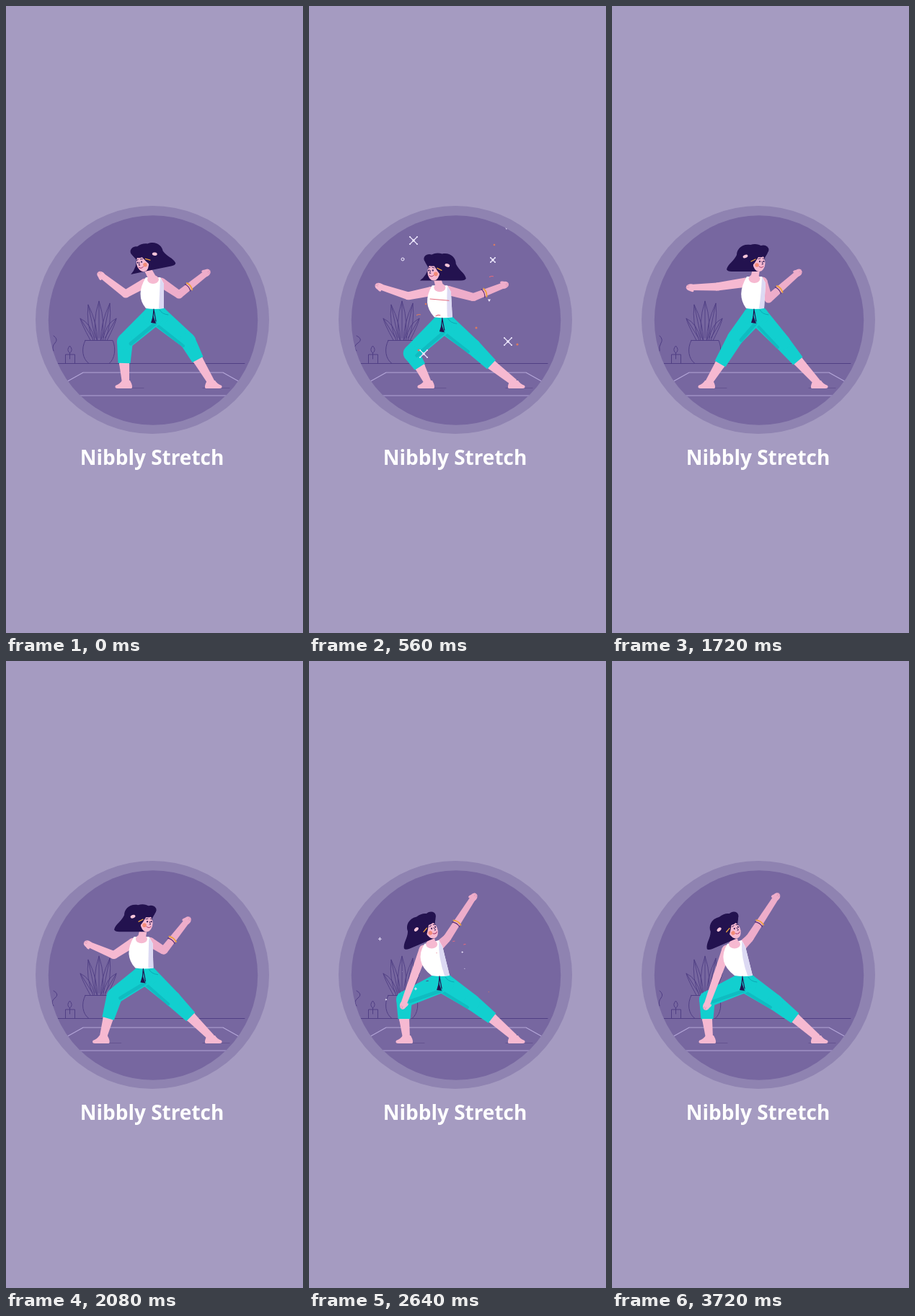
Write an HTML page with a canvas that moves like this. It is 412x869 px and loops after 3.8 s.

```html
<!DOCTYPE html>
<html lang="en">
<head>
<meta charset="utf-8">
<title>Nibbly Stretch</title>
<style>
  html, body { margin: 0; width: 100%; height: 100%; overflow: hidden; background: #a59bc1; }
  canvas { position: absolute; left: 0; top: 0; width: 412px; height: 869px; }
  h1 {
    position: absolute; left: 0; top: 605px; width: 405px; margin: 0;
    font: 700 28px/40px "Noto Sans", "Open Sans", sans-serif;
    color: #fff; text-align: center; white-space: nowrap;
  }
</style>
</head>
<body>
<canvas></canvas>
<h1>Nibbly Stretch</h1>
<script>
const LOOP = 3800, STEP = 40, TAU = Math.PI * 2;
const canvas = document.querySelector('canvas');
const ctx = canvas.getContext('2d');
const dpr = window.devicePixelRatio || 1;
canvas.width = 412 * dpr;
canvas.height = 869 * dpr;

const SKIN = '#f6b9d1', SKIN_BACK = '#eeadca', HAIR = '#23124f', PANTS = '#12cfcf',
      PANTS_DARK = '#0fbcc1', INK = '#503f84', WHITE = '#f0eaff', ORANGE = '#d87a60', RED = '#e36a7c';

// Joint order: face, shoulders, left elbow/hand, right elbow/hand, waist,
// left knee/hem/ankle, right knee/hem. "dir" is the side she looks to.
const rise = { dir: -1, tilt: -0.2, joints: [
  [191,354], [191,380], [217,380], [166,399], [132,373], [240,400], [278,370],
  [207,419], [165,465], [164,495], [166,522], [252,464], [266,490]] };
const lunge = { dir: -1, tilt: 0, joints: [
  [175,366], [168,391], [195,391], [138,402], [98,388], [228,404], [271,386],
  [187,431], [142,481], [154,500], [165,522], [227,472], [253,497]] };
const settle = { dir: -1, tilt: 0, joints: [
  [174,369], [167,393], [194,393], [136,401], [95,393], [228,401], [271,391],
  [186,433], [140,483], [153,500], [165,522], [227,473], [253,497]] };
const turn = { dir: 1, tilt: 0, joints: [
  [202,354], [184,379], [211,379], [146,389], [109,390], [217,406], [258,370],
  [199,419], [171,460], [150,496], [134,522], [236,466], [258,492]] };
const sweep = { dir: 1, tilt: 0, joints: [
  [187,366], [168,391], [195,391], [152,420], [117,394], [220,398], [247,353],
  [188,430], [137,467], [136,495], [135,522], [228,470], [255,494]] };
const reach = { dir: 1, tilt: -0.4, joints: [
  [167,372], [157,396], [183,391], [146,436], [131,478], [191,384], [228,327],
  [183,436], [132,469], [132,496], [135,522], [226,473], [254,495]] };

const easeOut = u => 1 - (1 - u) ** 2;
const easeIn = u => u ** 3;
const easeBoth = u => (1 - Math.cos(Math.PI * u)) / 2;
const keys = [
  { at: 0, pose: rise },
  { at: 540, pose: lunge, ease: easeBoth },
  { at: 820, pose: settle, ease: easeOut },
  { at: 1460, pose: settle, ease: easeOut },
  { at: 1720, pose: turn, ease: easeIn },
  { at: 2360, pose: sweep, ease: easeBoth },
  { at: 2680, pose: reach, ease: easeOut },
  { at: LOOP, pose: reach, ease: easeOut }
];

// Each spark: kind, colour, x, y, size; places hold at the burst's "ref" time.
const bursts = [
  { from: 440, ref: 560, to: 940, sparks: [
    ['x', WHITE, 145, 325, 5], ['x', WHITE, 255, 352, 3], ['x', WHITE, 276, 465, 5],
    ['x', WHITE, 159, 482, 5], ['v', WHITE, 250, 408, 2], ['v', WHITE, 274, 308, 2],
    ['o', WHITE, 130, 351, 2], ['.', ORANGE, 257, 331, 1.3], ['~', RED, 253, 375, 2.5],
    ['.', ORANGE, 232, 446, 1.5], ['.', ORANGE, 289, 469, 1.6], ['~', ORANGE, 152, 428, 2.5],
    ['.', ORANGE, 152, 477, 1.5], ['-', RED, 181, 407, 13], ['~', RED, 179, 429, 3],
    ['.', ORANGE, 162, 413, 1.3]] },
  { from: 800, ref: 1200, to: 1440, sparks: [
    ['v', WHITE, 106, 340, 2.4], ['+', WHITE, 271, 344, 5], ['+', WHITE, 98, 447, 2.5],
    ['>', WHITE, 260, 481, 2.5], ['o', ORANGE, 322, 483, 2.3], ['+', WHITE, 154, 510, 7],
    ['~', WHITE, 207, 427, 2]] },
  { from: 2240, ref: 2360, to: 2720, sparks: [
    ['+', WHITE, 105, 387, 5], ['+', WHITE, 151, 451, 4], ['o', WHITE, 113, 465, 2],
    ['.', RED, 178, 405, 1.5], ['~', RED, 214, 394, 3], ['.', ORANGE, 245, 455, 1.7],
    ['.', WHITE, 214, 425, 1.5], ['.', WHITE, 134, 429, 1], ['o', WHITE, 211, 404, 1.8],
    ['~', RED, 200, 390, 3], ['.', ORANGE, 129, 487, 1.3], ['~', INK, 166, 441, 3]] },
  { from: 2680, ref: 3040, to: 3420, sparks: [
    ['+', WHITE, 237, 386, 5], ['+', WHITE, 326, 446, 7], ['+', WHITE, 110, 485, 7],
    ['+', WHITE, 87, 437, 2.3], ['.', ORANGE, 312, 476, 1.7], ['.', ORANGE, 73, 424, 1.2],
    ['~', WHITE, 206, 416, 16], ['~', RED, 242, 468, 10], ['~', WHITE, 188, 441, 11],
    ['~', ORANGE, 141, 430, 3], ['.', INK, 265, 376, 1.3], ['.', INK, 283, 331, 1.3]] }
];

const mix = (a, b, u) => a + (b - a) * u;
const mixPoint = (a, b, u) => [mix(a[0], b[0], u), mix(a[1], b[1], u)];
const shift = (p, x, y) => [p[0] + x, p[1] + y];

function poseAt(t) {
  const i = Math.max(1, keys.findIndex(k => t < k.at));
  const a = keys[i - 1], b = keys[i];
  const raw = (t - a.at) / (b.at - a.at), u = b.ease(raw);
  return {
    dir: raw < 0.75 ? a.pose.dir : b.pose.dir,
    tilt: mix(a.pose.tilt, b.pose.tilt, u),
    joints: a.pose.joints.map((p, n) => mixPoint(p, b.pose.joints[n], u))
  };
}

function fillPath(color, d) { ctx.fillStyle = color; ctx.fill(new Path2D(d)); }

function strokePath(color, width, d) {
  ctx.strokeStyle = color;
  ctx.lineWidth = width;
  ctx.stroke(new Path2D(d));
}

function oval(color, x, y, rx, ry = rx, turnBy = 0) {
  ctx.fillStyle = color;
  ctx.beginPath();
  ctx.ellipse(x, y, rx, ry, turnBy, 0, TAU);
  ctx.fill();
}

// Tapered chain of segments with rounded joints.
function limb(color, points, radii) {
  ctx.fillStyle = color;
  for (let i = 1; i < points.length; i++) {
    const [ax, ay] = points[i - 1], [bx, by] = points[i];
    const len = Math.hypot(bx - ax, by - ay) || 1;
    const nx = (ay - by) / len, ny = (bx - ax) / len, ra = radii[i - 1], rb = radii[i];
    ctx.beginPath();
    ctx.moveTo(ax + nx * ra, ay + ny * ra);
    ctx.lineTo(bx + nx * rb, by + ny * rb);
    ctx.lineTo(bx - nx * rb, by - ny * rb);
    ctx.lineTo(ax - nx * ra, ay - ny * ra);
    ctx.fill();
    oval(color, ax, ay, ra);
  }
}

function drawRoom(t) {
  strokePath(INK, 1, 'M60 495.5H331');
  strokePath('#b4a6d8', 1.2, 'M40 545.5L107 508H301L368 545.5M60 540H346');
  strokePath(INK, 1, 'M110 463.5H148C153 475 151 489 143 495.5H115C106 489 104 475 110 463.5Z');
  for (const [x, y, w] of [[129, 409, 7], [114, 414, 5], [144, 412, 5], [103, 433, 4], [153, 433, 4]]) {
    const base = 129 + (x - 129) * 0.35, mid = (x + base) / 2;
    strokePath(INK, 0.9, `M${base - 3} 463Q${mid - w - 3} 440 ${x} ${y}Q${mid + w + 3} 440 ${base + 3} 463M${x} ${y}L${base} 460`);
  }
  strokePath(INK, 1, 'M82.5 495V483H95.5V495M88.5 489V481M88.5 481Q83 477 88.5 471Q94 477 88.5 481');
  const sway = 3 * Math.sin(t / 1900 * TAU);
  strokePath(INK, 1, `M66 457Q${73 + sway} 462 68 467T66 478`);
}

function drawFoot(ankle, dir) {
  ctx.save();
  ctx.translate(...ankle);
  strokePath('#655490', 1.2, 'M-12 7.5H25');
  ctx.scale(dir, 1);
  fillPath(SKIN, 'M-6 -3H5Q8 2 14 4Q16 8 11 8H-8Q-11 6 -6 -3Z');
  ctx.restore();
}

function drawHand(elbow, hand, color) {
  const angle = Math.atan2(hand[1] - elbow[1], hand[0] - elbow[0]);
  ctx.save();
  ctx.translate(...hand);
  ctx.rotate(angle);
  oval(color, 0, 0, 6.2, 4.8);
  oval(color, -1, -4, 3.5, 1.8, 0.5);
  strokePath('#d992b5', 0.7, 'M2 0H6M2 2.5H5');
  ctx.restore();
}

function drawBracelet(elbow, hand) {
  const [x, y] = mixPoint(elbow, hand, 0.38);
  ctx.save();
  ctx.translate(x, y);
  ctx.rotate(Math.atan2(hand[1] - elbow[1], hand[0] - elbow[0]));
  strokePath('#eea23c', 1.8, 'M0 -6Q3 0 0 6');
  strokePath('#5c2c72', 1.1, 'M-3 -6Q0 0 -3 6');
  ctx.restore();
}

function drawHead(face, tilt, dir) {
  ctx.save();
  ctx.translate(...face);
  ctx.rotate(tilt);
  ctx.scale(dir, 1);
  fillPath(HAIR, 'M14 -12C8 -22 0 -26 -10 -23C-22 -25 -29 -17 -29 -9C-33 0 -41 3 -43 11Q-42 14 -36 14H2L10 -5Z');
  if (dir < 0) fillPath(HAIR, 'M8 -8Q11 7 21 14H2Z');
  oval(HAIR, 8, -16, 7.5, 6.5);
  oval(SKIN, 2, 2, 8.5, 12);
  fillPath(HAIR, 'M13 -10Q8 -5 1 -6Q-3 1 -8 7L-14 -12L5 -15Z');
  oval('#f38c78', -1, 5, 2.8);
  oval(HAIR, 3, 0, 0.9, 1.2);
  oval(HAIR, 8.5, 0, 0.9, 1.2);
  strokePath(HAIR, 0.8, 'M1 -3.5L4 -4M7 -4L10 -3M6 0L7.5 4H6');
  strokePath('#a33263', 0.9, 'M2 7Q5 10 8 7');
  oval('#f7c5d9', -17, -7, 3.5, 2.2, -0.35);
  strokePath('#eea23c', 1.3, 'M-9 0L-3 -3');
  ctx.restore();
}

function drawWoman({ joints, tilt, dir }) {
  const [face, shL, shR, elL, handL, elR, handR, waist, kneeL, hemL, ankleL, kneeR, hemR] = joints;
  const ankleR = [285, 522];
  const hipL = shift(waist, -3, 11), hipR = shift(waist, 4, 11);
  const [wx, wy] = waist;

  limb(SKIN_BACK, [shift(shR, -2, 3), elR, handR], [6.5, 5.5, 4]);
  drawHand(elR, handR, SKIN_BACK);
  drawBracelet(elR, handR);

  limb(SKIN, [hemR, ankleR], [7, 5]);
  limb(SKIN, [hemL, ankleL], [7, 5]);
  drawFoot(ankleR, 1);
  drawFoot(ankleL, -1);

  limb(PANTS, [hipR, kneeR, hemR], [14, 11, 8.5]);
  const inner = shift(hipR, -3, 11);
  strokePath(PANTS_DARK, 4, `M${inner}L${shift(kneeR, -6, 7)}`);
  limb(PANTS, [hipL, kneeL, hemL], [14, 11, 8.5]);
  strokePath(PANTS_DARK, 5, `M${shift(hipL, 3, 10)}L${shift(kneeL, 8, 3)}`);
  strokePath('#0a9fae', 0.8, `M${wx + 6} ${wy + 2}Q${wx + 9} ${wy + 8} ${wx + 18} ${wy + 9}`);

  limb(SKIN, [shift(shL, 2, 4), elL, handL], [6.5, 5.5, 4]);
  drawHand(elL, handL, SKIN);

  const chest = mixPoint(shL, shR, 0.5);
  const [lx, ly] = shL, [rx, ry] = shR;
  fillPath('#fff', `M${lx + 3} ${ly - 4}Q${lx - 12} ${ly + 21} ${wx - 13} ${wy}Q${wx} ${wy + 2} ${wx + 12} ${wy}L${rx + 2} ${ry + 5}L${rx - 3} ${ry - 4}Z`);
  fillPath('#dcd9f3', `M${rx - 3} ${ry - 3}L${rx + 2} ${ry + 5}L${wx + 12} ${wy}H${wx + 5}Q${rx - 4} ${ry + 20} ${rx - 3} ${ry - 3}Z`);
  oval(SKIN, chest[0], chest[1] - 1, 8, 6);
  limb(SKIN, [mixPoint(face, chest, 0.4), shift(chest, 0, -1)], [5, 5.5]);
  strokePath(HAIR, 1.2, `M${wx - 2} ${wy + 1}L${wx - 3} ${wy + 12}M${wx - 2} ${wy + 2}L${wx + 1} ${wy + 18}`);
  fillPath(HAIR, `M${wx - 3} ${wy + 10}L${wx - 6} ${wy + 20}L${wx + 1} ${wy + 21}Z`);
  drawHead(face, tilt, dir);
}

const marks = {
  'x': 'M-1 -1L1 1M-1 1L1 -1',
  '+': 'M-1 0H1M0 -1V1',
  'v': 'M-1 -.8H1L0 1Z',
  '>': 'M-.6 -1L.6 0L-.6 1',
  '-': 'M-1 -.08L1 .1',
  '~': 'M-1 .2Q0 -.4 1 -.1'
};

function drawSpark([kind, color, x, y, size], scale) {
  ctx.save();
  ctx.translate(x, y);
  const r = size * scale;
  if (kind === '.') oval(color, 0, 0, r);
  else if (kind === 'o') {
    ctx.strokeStyle = color;
    ctx.lineWidth = 1;
    ctx.beginPath();
    ctx.arc(0, 0, r, 0, TAU);
    ctx.stroke();
  } else if (r > 0.1) {
    if (kind === 'x') {
      oval(color, 0, 0, 1.7);
      for (const [sx, sy] of [[1, 1], [1, -1], [-1, 1], [-1, -1]]) oval(color, sx * r, sy * r, 0.9);
    }
    ctx.scale(r, r);
    if (kind === 'v') fillPath(color, marks.v);
    else strokePath(color, 1.1 / r, marks[kind]);
    if (kind === '+') oval('#7767a0', 0, 0, 0.22);
  }
  ctx.restore();
}

function drawBursts(t) {
  for (const { from, ref, to, sparks } of bursts) {
    if (t < from || t > to) continue;
    const scale = Math.min(1, (t - from) / 110, (to - t) / 220);
    const spread = 1 + 0.28 * (t - ref) / 1000;
    for (const [kind, color, x, y, size] of sparks) {
      drawSpark([kind, color, mix(190, x, spread), mix(410, y, spread), size], scale);
    }
  }
}

function frame(now) {
  const t = Math.min(Math.floor(now % LOOP / STEP) * STEP, 3720);
  ctx.setTransform(dpr, 0, 0, dpr, 0, 0);
  ctx.fillStyle = '#a59bc1';
  ctx.fillRect(0, 0, 412, 869);
  ctx.lineCap = ctx.lineJoin = 'round';
  oval('#8f83b1', 203, 435, 162, 158);
  oval('#7767a0', 204, 435.5, 145.2);
  ctx.save();
  ctx.beginPath();
  ctx.arc(204, 435.5, 145.2, 0, TAU);
  ctx.clip();
  drawRoom(t);
  drawWoman(poseAt(t));
  drawBursts(t);
  ctx.restore();
}

const start = performance.now();
function tick() {
  frame(performance.now() - start);
  requestAnimationFrame(tick);
}
tick();
</script>
</body>
</html>
```
